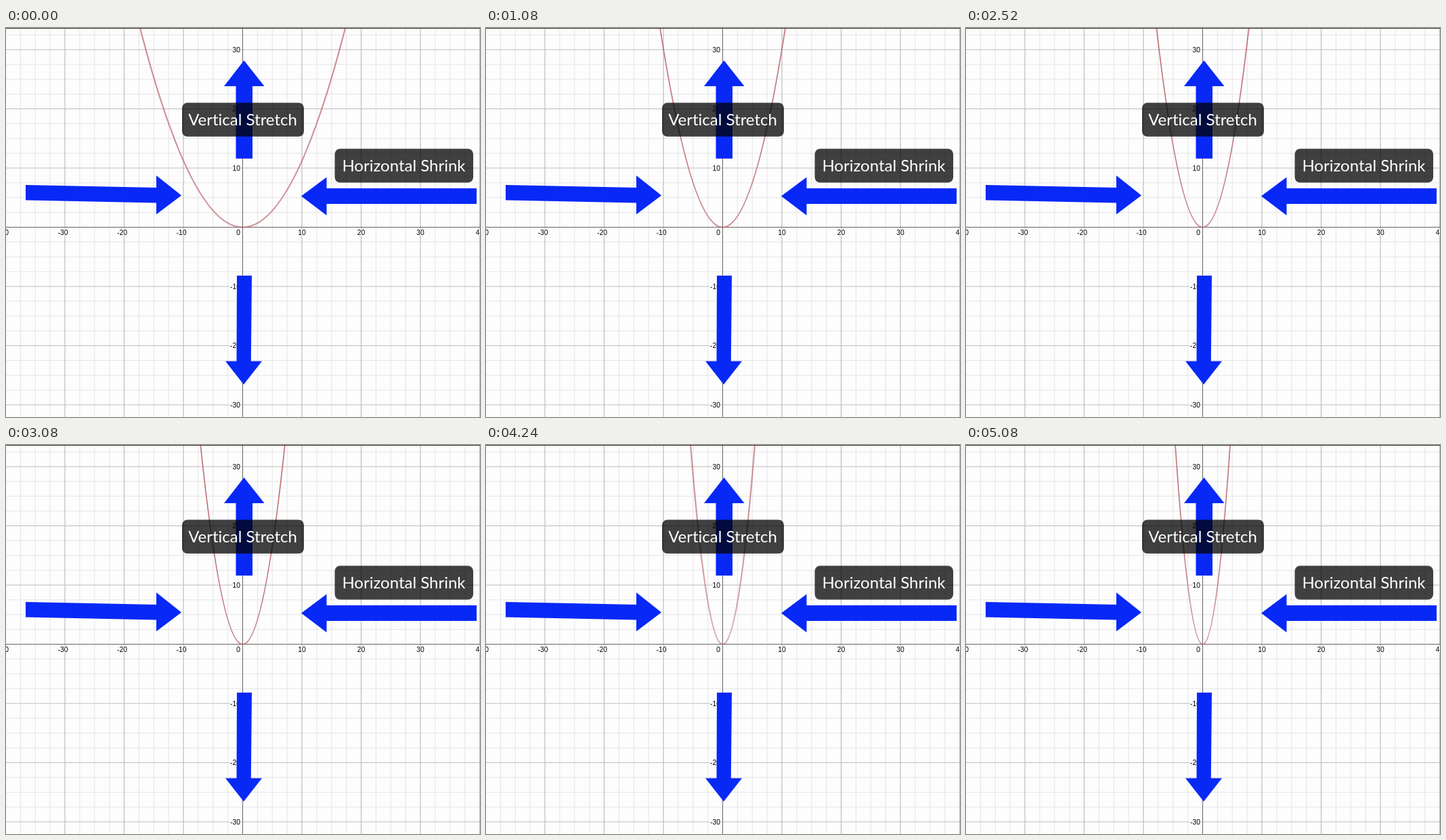
Animation, 700 px wide and 575 px high, one loop 5.56 s. Source, as an HTML page:

```html
<!DOCTYPE html>
<html lang="en">
<head>
<meta charset="utf-8">
<title>Vertical stretch, horizontal shrink</title>
<style>
  html, body { margin: 0; width: 100%; height: 100%; overflow: hidden; background: #fdfdfd; }
  svg { display: block; }
  .minor { stroke: #e4e4e4; }
  .major { stroke: #bdbdbd; stroke-width: 1.2; }
  .axis { stroke: #666; }
  #ticks { font: 10.3px "Liberation Sans", Arial, sans-serif; fill: #000;
    stroke: #fdfdfd; stroke-width: 2.5px; paint-order: stroke; }
  #arrows { fill: #0828f6; }
  #tags rect { fill: #000; fill-opacity: .75; }
  #tags text { font: 24px Lato, sans-serif; font-variant-ligatures: none;
    fill: #fff; text-anchor: middle; }

  #curve { fill: none; stroke: #b9666c; stroke-width: 1.5; vector-effect: non-scaling-stroke;
    transform-origin: 0 0;
    animation: squeeze 5560ms cubic-bezier(.33, .5, .67, .85) infinite; }

  /* Slider drags with short rests between them */
  @keyframes squeeze {
    0% { transform: scaleX(1); }
    3.6%, 6.5% { transform: scaleX(.84); }
    20.9%, 24.5% { transform: scaleX(.597); }
    34.5% { transform: scaleX(.504); }
    49.6%, 51.8% { transform: scaleX(.438); }
    71.9%, 72.7% { transform: scaleX(.33); }
    91.4%, 100% { transform: scaleX(.267); }
  }
</style>
</head>
<body>
<svg width="700" height="575" viewBox="0 0 700 575">
  <g id="grid"></g>
  <g id="ticks"></g>
  <g transform="translate(349.5 294.5)">
    <path id="curve" d="M-159.3 -324.7Q0 324.7 159.3 -324.7"/>
  </g>
  <g id="arrows">
    <path d="M351.5 48L381.5 86H364V193H339.5V86H322Z"/>
    <path d="M341 366H363L361.8 492.5H378L351 527L324 492.5H340.5Z"/>
    <path d="M29 232L222 236V218L259 247.5L222 275.5V258.5L29 254.5Z"/>
    <path d="M436 248.5L473.5 220.5V237H695V260H473.5V277Z"/>
  </g>
  <g id="tags">
    <rect x="260" y="110.5" width="180" height="50" rx="8"/>
    <text x="349.5" y="144">Vertical Stretch</text>
    <rect x="485.5" y="178.5" width="204.5" height="50" rx="8"/>
    <text x="587.5" y="212">Horizontal Shrink</text>
  </g>
  <rect width="700" height="1" fill="#333"/>
</svg>
<script>
  const CX = 349.5, CY = 294.5, UNIT = 8.75;
  const $ = id => document.getElementById(id);

  // Grid lines every 2.5 units, heavier every 10
  function gridLines(kind, keep) {
    let d = '';
    for (let i = -16; i <= 16; i++) {
      const step = i * 2.5 * UNIT;
      if (keep(i)) d += `M${CX + step} 0V575M0 ${CY + step}H700`;
    }
    return `<path class="${kind}" d="${d}"/>`;
  }
  $('grid').innerHTML =
    gridLines('minor', i => i % 4) +
    gridLines('major', i => i && i % 4 === 0) +
    gridLines('axis', i => i === 0);

  const label = (x, y, anchor, n) =>
    `<text x="${x}" y="${y}" text-anchor="${anchor}">${n}</text>`;
  let ticks = label(343, 305.5, 'middle', 0);
  for (let n = -40; n <= 40; n += 10) {
    if (!n) continue;
    ticks += label(CX + n * UNIT - (n < 0 ? 3 : 0), 305.5, 'middle', n);
    ticks += label(346, CY - n * UNIT + 3.6, 'end', n);
  }
  $('ticks').innerHTML = ticks;
</script>
</body>
</html>
```
